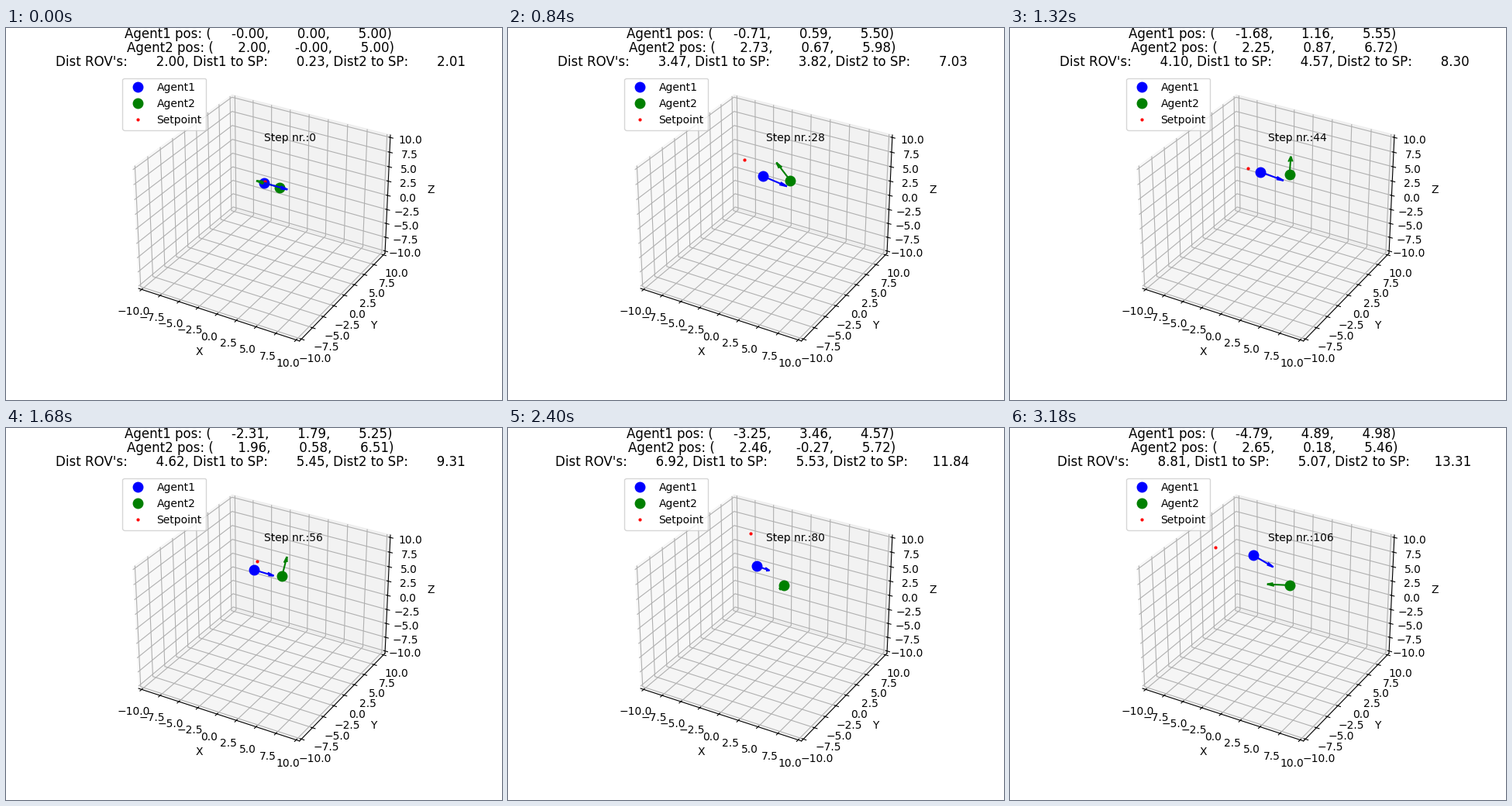
Animation of 640x480 px, one loop 3210 ms. Source, as a matplotlib script:

```python
import numpy as np
from numpy import cos, exp, sin
import matplotlib.pyplot as plt
from matplotlib.animation import FuncAnimation

STEPS = 107
ARROW = 3.0
TURN = .0893

k = np.arange(STEPS, dtype=float)
phase = TURN * k


def path(x, y, z):
    return np.column_stack([x, y, z])


def unit(vectors):
    return vectors / np.linalg.norm(vectors, axis=1, keepdims=True)


def distance(a, b):
    return np.linalg.norm(a - b, axis=1)


def settle(tau):
    """Rise from 0 to 1 as the start-up transient dies out."""
    return 1 - exp(-k / tau)


# The setpoint drifts along -x while weaving in y and bobbing in z.
setpoint = path(-.073 * k + 1.1 * (cos(phase + .25) - cos(.25)),
                .14 + 3.6 * (1 - cos(.041 * k)) + .9 * sin(.115 * k),
                5 + 2 * sin(TURN * (k + 1)))

# Agent 1 trails it with a lag; agent 2 wanders around its own place.
lag = k - 20 * settle(20)
agent1 = path(-.001 - .0565 * lag + .17 * sin(phase) - .08 * sin(phase / 2),
              .0545 * lag + .12 * sin(phase) - .20 * sin(phase / 2),
              5 + .48 * (sin(.07 * (k - 17)) + sin(.07 * 17) * exp(-k / 28)))
agent2 = path(2.37 + .42 * cos(.085 * (k - 22)) - .246 * exp(-k / 6),
              .28 + .6 * cos(.07 * (k - 41)) + .297 * exp(-k / 10),
              5 + 1.4 * sin(.029 * k) + .38 * (cos(.105 * (k - 44)) + .09 * exp(-k / 10)))

yaw = settle(16) * (-.17 + .34 * cos(.062 * (k - 28)))
pitch = -.38 * settle(16) * sin(.07 * (k - 5))
heading1 = ARROW * path(cos(pitch) * cos(yaw), cos(pitch) * sin(yaw), sin(pitch))
heading2 = ARROW * unit(path(-.45 - .55 * cos(.059 * k),
                             .85 * exp(-((k - 70) / 13) ** 2),
                             .9 * sin(.042 * k) + .6 * sin(.13 * k)))

gap = distance(agent1, agent2)
dist1 = distance(agent1, setpoint)
dist2 = distance(agent2, setpoint)

fig = plt.figure(figsize=(6.4, 4.8), dpi=100)
ax = fig.add_subplot(projection="3d")
lim = 10 * 25 / 24
ax.set(xlim=(-lim, lim), ylim=(-lim, lim), zlim=(-lim, lim),
       xlabel="X", ylabel="Y", zlabel="Z")


def dot(color, size, label):
    return ax.plot([0], [0], [0], color + "o", markersize=size, label=label)[0]


dots = [(dot("b", 9, "Agent1"), agent1),
        (dot("g", 9, "Agent2"), agent2),
        (dot("r", 2, "Setpoint"), setpoint)]
ax.legend(loc="upper left")
counter = ax.text(0, 0, 12, "")
title = ax.set_title("", y=1.0, linespacing=1)
title.set_y(1.0)  # 3D axes pull their title down
arrows = []


def update(n):
    for line, points in dots:
        line.set_data_3d(*points[n][:, None])
    while arrows:
        arrows.pop().remove()
    for points, heading, color in ((agent1, heading1, "b"), (agent2, heading2, "g")):
        arrows.append(ax.quiver(*points[n], *heading[n], color=color))
    counter.set_text(f"Step nr.:{n}")
    pos = "({:10.2f}, {:10.2f}, {:10.2f})"
    title.set_text(
        "Agent1 pos: " + pos.format(*agent1[n]) + " \n"
        "Agent2 pos: " + pos.format(*agent2[n]) + "\n"
        f"Dist ROV's: {gap[n]:10.2f}, Dist1 to SP: {dist1[n]:10.2f}, "
        f"Dist2 to SP: {dist2[n]:10.2f}")
    return []


anim = FuncAnimation(fig, update, frames=STEPS, init_func=lambda: [],
                     interval=30, repeat=True, repeat_delay=0)
plt.show()
```
